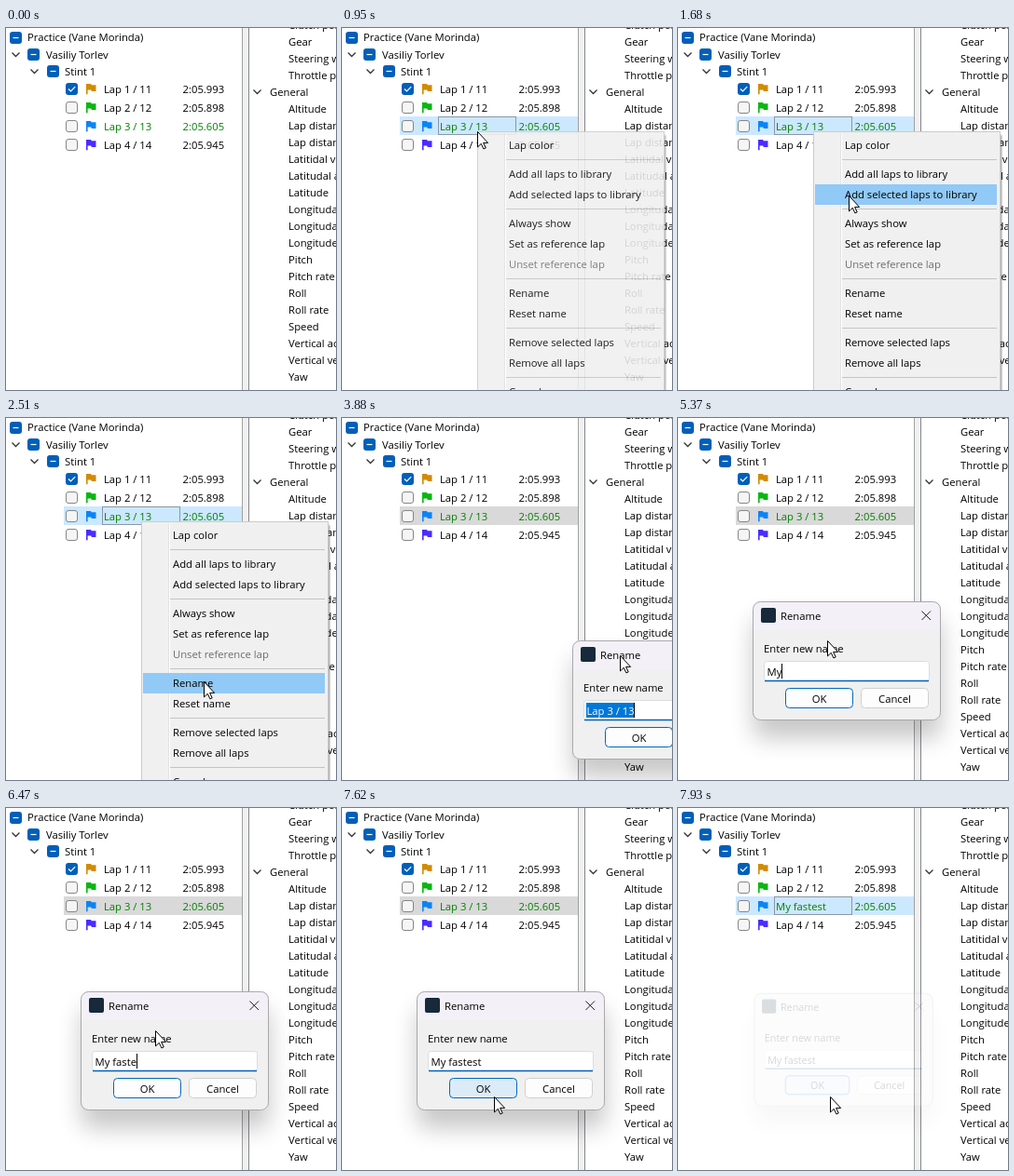
An HTML page for the animation above (8000 ms loop, 354 px wide and 389 px high).

```html
<!DOCTYPE html>
<html lang="en">
<head>
<meta charset="utf-8">
<title>Rename a lap</title>
<style>
  html, body { margin: 0; width: 100%; height: 100%; overflow: hidden; background: #fff; }
  svg { display: block; width: 354px; height: 389px; }
  text { font: 11.27px "Open Sans", "Noto Sans", sans-serif; white-space: pre; }
</style>
</head>
<body>
<svg id="stage" viewBox="0 0 354 389" xmlns="http://www.w3.org/2000/svg"></svg>
<script>
(() => {
  const LOOP = 8000;
  const BLUE = '#005fb8';

  // Markup helpers
  const text = (x, y, s, fill = '#000', extra = '') =>
    `<text x="${x}" y="${y}" fill="${fill}" ${extra}>${s}</text>`;
  const rect = (x, y, w, h, fill, extra = '') =>
    `<rect x="${x}" y="${y}" width="${w}" height="${h}" fill="${fill}" ${extra}/>`;
  const line = (d, color, width = 1) =>
    `<path d="${d}" fill="none" stroke="${color}" stroke-width="${width}"/>`;
  const chevron = (x, y) => line(`M${x} ${y}l4 4 4-4`, '#333', 1.3);
  const box = (x, y, mark) => mark
    ? rect(x, y, 13, 13, BLUE, 'rx="3"') + line(mark === 'some'
        ? `M${x + 3.5} ${y + 6.5}h6` : `M${x + 3} ${y + 6.5}l2.5 2.5 4.7-4.8`, '#fff', 1.2)
    : rect(x + .5, y + .5, 12, 12, '#f5f5f5', 'rx="2.5" stroke="#868686"');
  const flag = (y, color) =>
    `<path d="M86 ${y}h5l.7 1.3h4.8v6.6h-4.6l-.7-1.3h-3.6v4.6H86z" fill="${color}"/>`;

  // Lap tree
  const laps = [
    ['Lap 1 / 11', '2:05.993', '#d08c00'],
    ['Lap 2 / 12', '2:05.898', '#06b80f'],
    ['Lap 3 / 13', '2:05.605', '#0a84f5'],
    ['Lap 4 / 14', '2:05.945', '#4a2cff']
  ];
  const rowY = i => 55 + i * 20;
  const lapRow = ([name, time, color], i) => {
    const y = rowY(i), ink = i === 2 ? '#008000' : '#000';
    return rect(62, y, 191, 20, 'none', `id="row${i}"`) + box(64, y + 4, i ? '' : 'all') +
      flag(y + 5, color) + text(105, y + 15, name, ink, `id="lap${i}"`) + text(189.5, y + 15, time, ink);
  };
  const tree =
    box(4, 4, 'some') + text(23, 14, 'Practice (Vane Morinda)') +
    chevron(6.5, 26.5) + box(23, 22, 'some') + text(43, 33, 'Vasiliy Torlev') +
    chevron(26.5, 44.5) + box(44, 40, 'some') + text(63, 51, 'Stint 1') +
    laps.map(lapRow).join('') +
    rect(103.5, 95.5, 83, 19, 'none', 'id="focus" stroke="#445" stroke-dasharray="1 1"');

  // Channel list
  const channels = ['Clutch position', 'Gear', 'Steering wheel', 'Throttle position', 'General', 'Altitude',
    'Lap distance', 'Lap distance', 'Latitidal velocity', 'Latitudal acceleration', 'Latitude',
    'Longitudal', 'Longitudal', 'Longitude', 'Pitch', 'Pitch rate', 'Roll', 'Roll rate', 'Speed',
    'Vertical acceleration', 'Vertical velocity', 'Yaw', 'Yaw rate'];
  const list = rect(253, 0, 8, 389, '#f0f0f0') +
    line('M253.5 0v389', '#a0a0a0') + line('M260.5 0v389', '#828790') + chevron(265.5, 66.5) +
    channels.map((s, i) => text(s === 'General' ? 283 : 303, 1 + i * 18, s)).join('');

  // Context menu: an empty entry is a separator
  const entries = ['Lap color', '', 'Add all laps to library', 'Add selected laps to library', '', 'Always show',
    'Set as reference lap', 'Unset reference lap', '', 'Rename', 'Reset name', '',
    'Remove selected laps', 'Remove all laps', '', 'Cancel'];
  const items = [];
  let menuBody = '', itemY = 115;
  for (const s of entries) {
    if (s) {
      const off = s.startsWith('Unset');
      items.push({ y: itemY, off });
      menuBody += text(179, itemY + 15, s, off ? '#6d6d6d' : '#000');
      itemY += 22;
    } else {
      menuBody += line(`M176 ${itemY + 4.5}H342`, '#c4c4c4');
      itemY += 9;
    }
  }
  const menu = '<g id="menu">' +
    rect(149, 115, 198, 300, '#000', 'opacity=".45" filter="url(#soft)"') +
    rect(145.5, 111.5, 200, 300, '#f0f0f0', 'stroke="#ccc"') +
    line('M174.5 114V389', '#e2e2e2') + line('M175.5 114V389', '#fff') +
    rect(147, 0, 195, 22, '#91c9f7', 'id="hot"') + menuBody + '</g>';

  // Dialog, drawn at its resting place
  const button = (x, label, stroke, id) =>
    rect(x + .5, 290.5, 72, 21, '#fdfdfd', `id="${id}" rx="4" stroke="${stroke}"`) +
    text(x + 36.5, 305.5, label, '#000', 'text-anchor="middle"');
  const dialog = '<g id="dialog">' +
    rect(81, 216, 201, 128, '#000', 'rx="8" opacity=".22" filter="url(#shade)"') +
    rect(81, 197, 201, 128, '#f0f0f0', 'rx="8"') +
    '<path d="M81 228V205a8 8 0 0 1 8-8H274a8 8 0 0 1 8 8V228z" fill="#f3f0f7"/>' +
    rect(80.5, 197.5, 201, 127, 'none', 'rx="8" stroke="#a9a9ac"') +
    rect(89, 204, 16, 16, '#17293a', 'rx="2"') + text(110, 217, 'Rename') +
    line('M261.5 207.5l9.5 9.5m0-9.5l-9.5 9.5', '#222') +
    text(92, 252, 'Enter new name') +
    rect(92.5, 261.5, 177, 21, '#fff', 'rx="3" stroke="#dcdcdc"') +
    line('M93 282.5H269', BLUE, 1.6) +
    rect(95, 264, 51, 16, '#0078d7', 'id="mark"') + text(95.5, 277, '', '#000', 'id="field"') +
    rect(0, 264, 1, 16, '#000', 'id="caret"') +
    button(115, 'OK', '#0067c0', 'ok') + button(196, 'Cancel', '#d0d0d0', 'cancel') + '</g>';

  const cursor = '<path id="cursor" d="M.5.5v16.4l3.8-3.6 2.6 5.6 2.3-1-2.6-5.5h5z" ' +
    'fill="#fff" stroke="#000" stroke-linejoin="round"/>';

  const $ = id => document.getElementById(id);
  const set = (id, name, value) => $(id).setAttribute(name, value);
  const show = (id, on) => set(id, 'visibility', on ? 'inherit' : 'hidden');

  $('stage').innerHTML =
    '<defs><filter id="shade" x="-40%" y="-60%" width="180%" height="220%">' +
    '<feGaussianBlur stdDeviation="13"/></filter>' +
    '<filter id="soft"><feGaussianBlur stdDeviation="1.3"/></filter></defs>' +
    rect(0, 0, 354, 389, '#fff') + tree + list + menu + dialog + cursor;

  // Motion in discrete steps: [first step, last step, count, x, y, easing power]
  const cursorPath = [
    [270, 710, 7, 145, 111, 1.5],
    [1350, 1830, 8, 205, 222, 1],
    [1980, 2510, 8, 212, 283, 1.2],
    [2880, 2960, 2, 418, 351, 1],
    [3880, 3880, 1, 298, 255, 1],
    [3958, 4190, 4, 150, 217, 1.7],
    [4380, 4500, 3, 160, 239, 1],
    [7330, 7470, 3, 163, 310, 1.2]
  ];
  const dialogPath = [[3958, 4190, 4, 0, 0, 1.7]];

  function along(path, x, y, t) {
    for (const [t0, t1, n, x1, y1, power] of path) {
      if (t < t0) break;
      const gap = n > 1 ? (t1 - t0) / (n - 1) : 1;
      const step = Math.min(n, Math.floor((t - t0) / gap + 1e-6) + 1);
      const p = 1 - (1 - step / n) ** power;
      x += (x1 - x) * p;
      y += (y1 - y) * p;
    }
    return [Math.round(x), Math.round(y)];
  }

  const hold = (table, t) => table.reduce((v, [at, next]) => t >= at ? next : v, 0);
  const menuFade = [[860, .45], [950, .88], [1020, 1], [2690, 0]];
  const dialogFade = [[3880, 1], [7770, .75], [7850, .4], [7930, .15]];
  const dialogScale = [[0, 1], [7770, .985], [7850, .968], [7930, .952]];
  const typed = 'My fastest';
  const keys = [5120, 5370, 5610, 5950, 6020, 6170, 6380, 6470, 6700, 6780];

  function draw(t) {
    const [cx, cy] = along(cursorPath, 170, 335, t);
    show('cursor', t >= 270);
    set('cursor', 'transform', `translate(${cx} ${cy})`);

    // Rows
    const selected = t >= 860 && t < 2690 || t >= 7770;
    laps.forEach((_, i) => {
      const hover = t >= 270 && t < 860 && cy >= rowY(i) && cy < rowY(i + 1);
      const picked = i === 2 && t >= 860;
      set('row' + i, 'fill', hover ? '#e5f3ff' : !picked ? 'none' : selected ? '#cce8ff' : '#d9d9d9');
    });
    show('focus', selected);
    $('lap2').textContent = t >= 7770 ? typed : laps[2][0];

    // Menu
    const fade = hold(menuFade, t);
    const hot = t >= 1350 && items.find(it => !it.off && cy >= it.y && cy < it.y + 22);
    show('menu', fade > 0);
    set('menu', 'opacity', fade);
    show('hot', hot);
    if (hot) set('hot', 'y', hot.y);

    // Dialog
    const alpha = hold(dialogFade, t), scale = hold(dialogScale, t);
    const [dx, dy] = along(dialogPath, 167, 42, t);
    show('dialog', alpha > 0);
    set('dialog', 'opacity', alpha);
    set('dialog', 'transform', `translate(${dx + 110} ${dy + 234}) scale(${scale}) translate(-110 -234)`);

    const count = keys.filter(k => t >= k).length;
    $('field').textContent = count ? typed.slice(0, count) : laps[2][0];
    set('field', 'fill', count ? '#000' : '#fff');
    show('mark', !count);
    show('caret', t < 4720 || t >= 5120 && t < 7330);
    set('caret', 'x', count ? Math.round(95 + $('field').getComputedTextLength()) : 146);
    set('ok', 'fill', t >= 7620 ? '#dcebf8' : '#fdfdfd');
  }

  // The menu's hot row inherits visibility, so it vanishes with the menu
  const start = performance.now();
  function tick() {
    draw((performance.now() - start) % LOOP);
    requestAnimationFrame(tick);
  }
  tick();
})();
</script>
</body>
</html>
```
